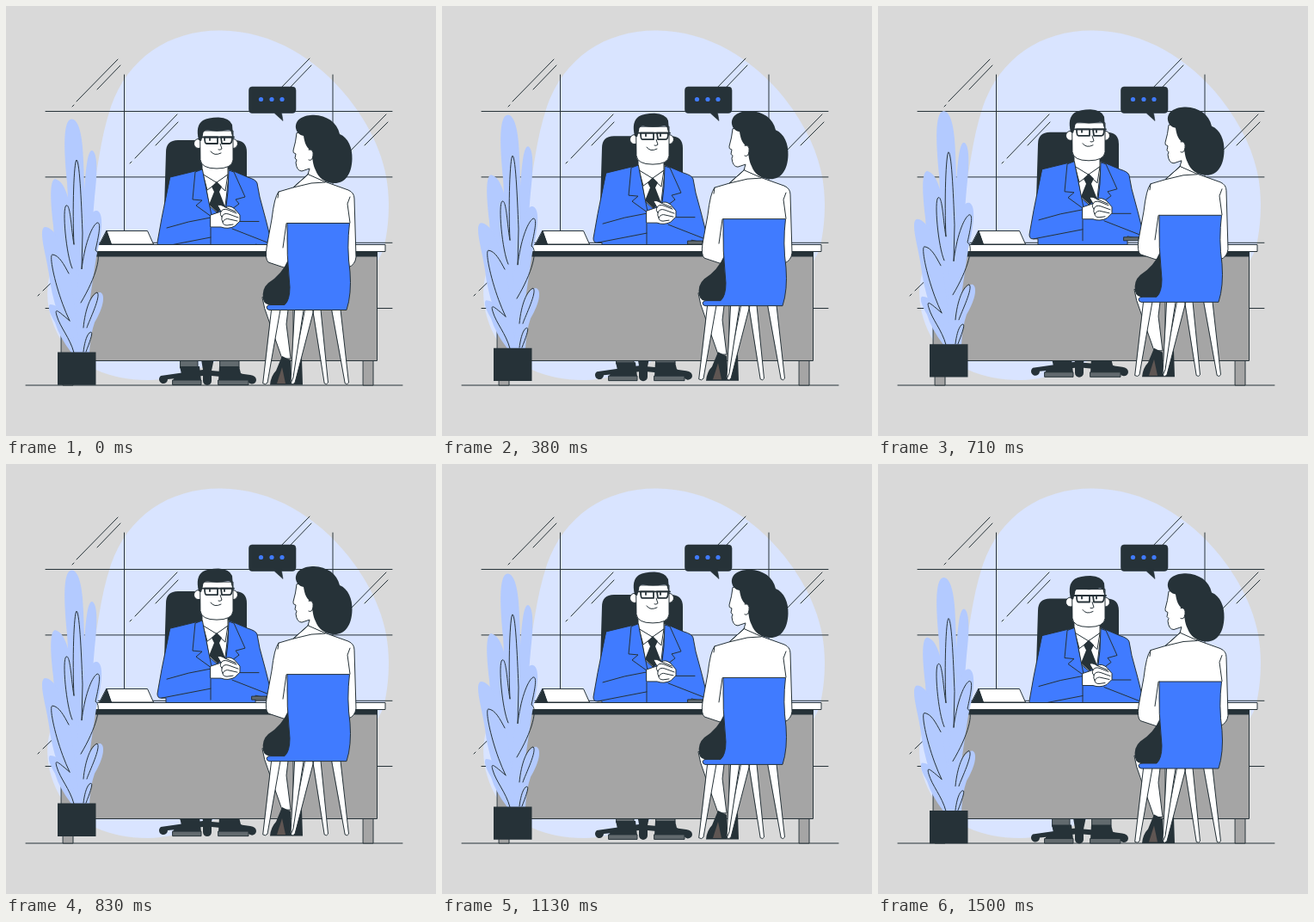
An HTML page for the animation above (1.54 s loop, 500 by 500 pixels).

```html
<!DOCTYPE html>
<html lang="en">
<head>
<meta charset="utf-8">
<title>Office interview</title>
<style>
  html, body { margin: 0; width: 100%; height: 100%; overflow: hidden; background: #d9d9d9; }
  svg { display: block; width: 100vw; height: 100vh; }
  .o { stroke: #263238; stroke-width: 1; stroke-linejoin: round; stroke-linecap: round; }
  .bold { stroke-width: 1.8; }
  .n { fill: none; }
  .w { fill: #fff; }
  .b { fill: #407bff; }
  .d { fill: #263238; }
  .g { fill: #a5a5a5; }
  .s { fill: #626a6e; }
  .leaf { fill: #b3caff; }
</style>
</head>
<body>
<svg viewBox="0 0 500 500">
  <rect width="500" height="500" fill="#d9d9d9"/>
  <path fill="#d9e4ff" d="M250 28.500C310 29 362 62 398 107C430 148 445 188 445 230C445 250 443 264 440 279C425 330 340 370 280 395C240 415 205 435 165 435C120 435 84 418 66 392C50 366 45 340 50 316C56 286 90 262 100 222C107 190 109 156 122 117C142 60 190 28 250 28.500Z"/>

  <!-- window -->
  <path class="o n" d="M46 122.500H449M46 198.900H449M46 275.300H449M46 351.500H449M137.500 80V277M380 80V277"/>
  <path class="o n" d="M130 62L82 111M79 115L77 117M133 69L106 97M199 126L150 177M146 181L144 183M200 135L174 162M353 61L318 97M355 69L330 95M442 126L396 173M444 135L417 162M66 309L43 331M39 335L37 337"/>

  <path class="o n" d="M23 441H461"/>

  <!-- man -->
  <g class="float">
    <path class="d" d="M226 405H243L239 424L262 426L284 429Q291 430 291 435A5 5 0 0 1 281 434L239 430V436A5 5 0 0 1 229 436V430L188 434A5 5 0 1 1 180 430L229 423Z"/>
    <path class="s o" d="M203 405H223V421H203ZM249 405H271V421H249Z"/>
    <path class="d" d="M202 419H225L227 436H194Q195 431 204 428ZM248 419H271L273 427Q281 431 282 436H247Z"/>
    <path class="s o" d="M194 435H227V440.500H194ZM247 435H282V440.500H247Z"/>

    <path class="d" d="M186 170Q186 156 200 156H266Q280 156 280 170V215L270 262H179L184 235Z"/>
    <path class="b o" d="M191 199L228 190H260L281 199Q291 202 292 206L295 222L302 248L309 276L304 280L290 277V300H186V280H180Q176 280 176 275L181 247Z"/>
    <path class="o n" d="M187 258Q212 250 238 246M181 280L238 269M238 258V282M294 250.500H272M309 277L263 259"/>
    <path class="s o" d="M286 278H303V282H286Z"/>
    <path class="w o" d="M229 190L236 232L245 240L255 232L260 190Z"/>
    <path class="w o" d="M228 180V196L244 207L258 196V180Z"/>
    <path class="w o" d="M229 196L234 214L245 206L255 215L258 196L245 205Z"/>
    <path class="d" d="M245 204L251 210L248 216L255 234L246 240L236 231L242 216L239 210Z"/>
    <path class="b o" d="M228 190L220 193L217 225L228 226L221 232L239 245Z"/>
    <path class="b o" d="M259 191L265 193L278 222L267 225L271 230L255 242Q259 216 259 191Z"/>
    <path class="w o" d="M238 243L250 239L246 232Q249 230 255 234Q260 231 266 236L272 243V250L266 256Q258 260 250 257L238 257Z"/>
    <path class="o n" d="M255 234L267 239M250 239Q252 235 258 237L268 241M251 245Q253 240 259 242L270 246M252 251Q255 246 260 248L269 250M250 239Q248 243 251 245M251 245Q250 249 252 251M252 251Q252 255 257 255L264 254"/>

    <circle class="w o" cx="224" cy="160" r="5.500"/>
    <circle class="w o" cx="264" cy="160" r="5.500"/>
    <path class="w o" d="M226 145H264V179Q263 189 245 189Q227 189 226 179Z"/>
    <path class="d" d="M224 156Q220 139 229 133Q235 129.500 247 129.500Q260 130 263 138L264.500 156L262 148Q262 144 258 144Q246 147 235 144.500Q229 144 229 150L227 157Z"/>
    <path class="w o bold" d="M231 152.500H246V160H233Q231 160 231 152.500ZM250 152.500H263Q263 160 260 160H251Z"/>
    <path class="o n bold" d="M225 152.500H265M237 154V156M254 154V156"/>
    <path class="o n" d="M249 160L251 166Q249 168 247 167M238 169Q242 175 250 171"/>
  </g>

  <!-- desk -->
  <path class="g o" d="M66.500 412H78V441H66.500ZM415.500 412H427V441H415.500Z"/>
  <path class="g o" d="M64.500 286H431.500V412.500H64.500Z"/>
  <path class="d" d="M64 286H432V291.500H64Z"/>
  <path class="w o" d="M56 277.500H441V285.500H56Z"/>
  <path class="w o" d="M117 261.500H164.500L171.500 277H122.500Z"/>
  <path class="d o" d="M117 261.500L122.500 277H109Z"/>

  <!-- bubble -->
  <path class="d" stroke="#263238" stroke-width=".6" d="M286 94H333Q337 94 337 98V120.500Q337 124.500 333 124.500H320.500L322 133.500L312 124.500H286Q282.500 124.500 282.500 120.500V98Q282.500 94 286 94Z"/>
  <g class="b">
    <circle cx="296.500" cy="108.500" r="2.600"/>
    <circle cx="309" cy="108.500" r="2.600"/>
    <circle cx="321" cy="108.500" r="2.600"/>
  </g>

  <!-- woman -->
  <g class="float">
    <path class="w o" d="M298 339Q300 352 305 364L321 410H331L326 370L329 345ZM334 350L334 410H343L350 352Z"/>
    <path class="d" d="M321 407L331 412L332 440.500H307Q308 430 314 424ZM336 407L344 410L345 440.500H331Q333 425 336 407Z"/>
    <path fill="#5f5653" d="M321 420L325 439H315Z"/>
    <path class="w o" d="M338 148Q337 158 334 168Q333 171 337 172L336 177L338 179L337 182Q338 192 344 192L353 189Q352 195 348 201L372 206L370 160L350 145Z"/>
    <path class="w o" d="M351 196L334 211L317 216Q312 222 309 248L303 281Q301 294 305 298L323 304H398Q406 301 407 292L405 224Q405 217 398 214L370 204Z"/>
    <path class="o n" d="M352 195L334 211L355 206L371 205M317 216L316 223M326 253L322 281M400 252L397 230L400 222"/>
    <path class="d" d="M337 142C336 131 347 126.800 358 126.800C373 127.500 385 135 388 149C398 153 403 165 402.500 178C402 196 394 206 382 206C370 206 363 199 360 191C357 185 357 180 356 177L352 166C348 162 347 157 346 151C341 150 338 147 337 142Z"/>
    <path class="w o" d="M352 167Q358 166 357 174Q356 181 352 179"/>
    <path class="d" d="M328 295Q321 312 305 322Q297 329 299 341Q300 348 310 348H332Z"/>
    <path class="w o" d="M309 353H319L304 438Q302 441 299 439ZM348 353H358L336 438Q334 441 331 439ZM357 353H366L374.500 438Q373 441 370.500 439ZM379 353H389L398.500 438Q397 441 394.500 439Z"/>
    <path class="w o" d="M336 353H346L334 432L331 439Z"/>
    <path class="b o" d="M327 252.500H399.500Q396 281 400 309Q402 335 396 353.500H306Q303 353 303 350Q304 347 308 347.500H324Q330 342 330 327Q326 290 327 252.500Z"/>
  </g>

  <!-- plant -->
  <g class="float">
    <g class="leaf">
      <path d="M76 131.500C84 131 89 148 90 180C93 245 90 330 84 403H76C69 330 75 265 71 205C68 175 65 133 76 131.500Z"/>
      <path d="M100 168C106 170 107 190 103 222C99 270 94 340 86 403H80C84 320 88 255 91 215C93 187 95 168 100 168Z"/>
      <path d="M57 201C71 204 77 235 82 285L85 403H79C72 345 57 295 55 255C52 230 50 203 57 201Z"/>
      <path d="M106 238C114 241 112 262 105 292C99 330 94 370 88 403H80C80 345 86 285 93 257C97 243 101 237 106 238Z"/>
      <path d="M45 257C59 257 69 286 76 320L86 403H77C64 370 53 340 50 312C47 290 37 260 45 257Z"/>
      <path d="M110 333C117 337 111 355 103 368Q98 382 97 403H82Q88 365 96 346Q103 332 110 333Z"/>
      <path d="M51 347C64 347 73 362 83 403H76Q62 385 57 368Q47 351 51 347Z"/>
    </g>
    <path class="o n" d="M79 277C77 235 79 181 82 179C86 180 88 240 89 264L88 306C91 280 99 256 106 252C111 251 108 266 104 284C112 288 105 315 87 345"/>
    <path class="o n" d="M77 305C70 290 65 235 70 232C75 229 76 262 79 277"/>
    <path class="o n" d="M74 366C59 335 49 289 54 289C62 290 67 300 73 311"/>
    <path class="o n" d="M90 374C92 352 99 335 106 333C111 337 97 365 94 374"/>
    <path class="o n" d="M74 366C61 355 56 350 59 360C63 374 74 385 79 403"/>
    <path class="o n" d="M93 402C98 389 103 376 97 380C93 384 91 394 90 402"/>
    <path class="d" d="M60 402.500H104.500V440.800H60Z"/>
  </g>
</svg>
<script>
  const LOOP = 1540, HALF = LOOP / 2, RISE = 10, LEAD = 50, STEP = 1000 / 24;
  const REST = RISE * LEAD / HALF;
  const parts = document.querySelectorAll('.float');

  // Linear rise and fall, stepped at 24 frames per second.
  function draw(ms) {
    const t = Math.floor((ms % LOOP + 5.1) / STEP) * STEP;
    const phase = (t + LEAD) % LOOP;
    const lift = RISE * (1 - Math.abs(phase - HALF) / HALF);
    const move = `translate(0 ${(REST - lift).toFixed(3)})`;
    parts.forEach(p => p.setAttribute('transform', move));
  }

  let start;
  function tick(now) {
    start ??= now;
    draw(now - start);
    requestAnimationFrame(tick);
  }
  draw(0);
  requestAnimationFrame(tick);
</script>
</body>
</html>
```
